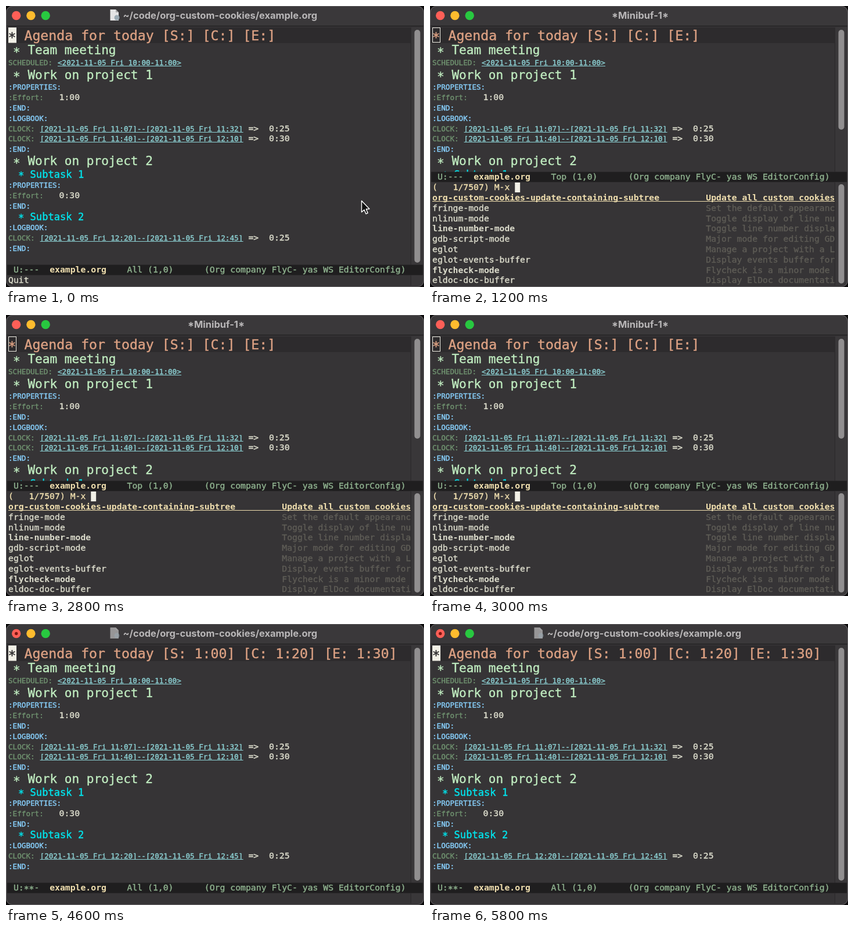
Write an HTML page with a canvas that moves like this. It is 720x484 px and loops after 6 s.

```html
<!DOCTYPE html>
<html lang="en">
<head>
<meta charset="utf-8">
<title>Org custom cookies</title>
<style>
  html, body { margin: 0; width: 100%; height: 100%; overflow: hidden; background: #000; }
  canvas { display: block; }
</style>
</head>
<body>
<canvas id="stage" width="720" height="484"></canvas>
<script>
const ctx = document.getElementById('stage').getContext('2d');

const LOOP = 6000, HIDE_POINTER = 600, OPEN_PROMPT = 1200, RUN_COMMAND = 3600;
const MONO = '"DejaVu Sans Mono", monospace';
const LEFT = 4, RIGHT = 697, ROW = 17.78, BASE = 13.8;
const BODY = 14.77, SMALL = 12.64, H1 = 23.2, H2 = 21.05, H3 = 17.1;

const C = {
  bg: '#363436', bar: '#3a383a', stripe: '#2d2b2d', track: '#393739', edge: '#2b292b',
  thumb: '#918f90', border: '#656365', mode: '#1f1e1f', modeText: '#8fb28f',
  text: '#dcdccc', yellow: '#f0dfaf', h1: '#dca183', h2: '#bfebbf', h3: '#00e5ee',
  drawer: '#87cefa', key: '#6f916f', date: '#8cd0d3', dim: '#5e5c56',
  cursor: '#f2f0e6', title: '#b9b7b8'
};

const COMMANDS = [
  ['fringe-mode', 'Set the default appearance of fringes'],
  ['nlinum-mode', 'Toggle display of line numbers'],
  ['line-number-mode', 'Toggle line number display', true],
  ['gdb-script-mode', 'Major mode for editing GDB scripts'],
  ['eglot', 'Manage a project with a Language Server'],
  ['eglot-events-buffer', 'Display events buffer for server'],
  ['flycheck-mode', 'Flycheck is a minor mode for checking', true],
  ['eldoc-doc-buffer', 'Display ElDoc documentation buffer']
];

function rect(x, y, w, h, color) {
  ctx.fillStyle = color;
  ctx.fillRect(x, y, w, h);
}

function disc(x, y, r, color) {
  ctx.fillStyle = color;
  ctx.beginPath();
  ctx.arc(x, y, r, 0, Math.PI * 2);
  ctx.fill();
}

function pill(x, y, w, h, r, color) {
  ctx.fillStyle = color;
  ctx.beginPath();
  ctx.roundRect(x, y, w, h, r);
  ctx.fill();
}

function shape(points, color) {
  ctx.fillStyle = color;
  ctx.beginPath();
  points.forEach(([x, y]) => ctx.lineTo(x, y));
  ctx.closePath();
  ctx.fill();
}

// Draws one run and returns the x after it; asterisks sit at mid height.
// Regular weight gets a hairline stroke to look as heavy as smoothed text.
function put(str, x, y, color, size = BODY, bold = false) {
  const step = size * 0.602;
  ctx.font = `${bold ? 'bold ' : ''}${size}px ${MONO}`;
  ctx.fillStyle = ctx.strokeStyle = color;
  ctx.lineWidth = 0.4;
  ctx.lineJoin = 'round';
  ctx.textAlign = 'left';
  let at = x;
  for (const part of str.split(/(\*)/)) {
    const base = part === '*' ? y + size * 0.15 : y;
    ctx.fillText(part, at, base);
    if (!bold) ctx.strokeText(part, at, base);
    at += part.length * step;
  }
  return at;
}

function link(str, x, y) {
  const end = put(str, x, y, C.date, SMALL);
  rect(x, Math.round(y + 1.2), end - x, 1, C.date);
  return end;
}

function outline(header, hollow) {
  let y = 37;
  const space = BODY * 0.602;

  const heading = (level, str) => {
    const [size, height, base, color] = level === 2
      ? [H2, 24.4, 19.4, C.h2] : [H3, 19.8, 16.1, C.h3];
    put('* ' + str, LEFT - 0.8 + (level - 1) * space, y + base, color, size);
    y += height;
  };
  const drawer = name => {
    put(`:${name}:`, LEFT, y + BASE, C.drawer, SMALL);
    y += ROW;
  };
  const effort = value => {
    const x = put(':Effort:', LEFT, y + BASE, C.key, SMALL);
    put('   ' + value, x, y + BASE, C.text);
    y += ROW;
  };
  const stamp = (key, date, rest = '') => {
    const x = put(key, LEFT, y + BASE, C.key, SMALL) + space;
    put(rest, link(date, x, y + BASE), y + BASE, C.text);
    y += ROW;
  };
  const clock = (from, to, sum) => stamp('CLOCK:',
    `[2021-11-05 Fri ${from}]--[2021-11-05 Fri ${to}]`, ` =>  ${sum}`);

  rect(0, 37, RIGHT, 27, C.stripe);
  if (hollow) {
    ctx.strokeStyle = C.cursor;
    ctx.lineWidth = 1;
    ctx.strokeRect(4.5, 37.5, 13, 25);
  } else {
    rect(4, 37, 14, 26.5, C.cursor);
  }
  const x = put('*', LEFT - 0.5, y + 21.5, hollow ? C.h1 : C.stripe, H1);
  put(' ' + header, x, y + 21.5, C.h1, H1);
  y += 27;

  heading(2, 'Team meeting');
  stamp('SCHEDULED:', '<2021-11-05 Fri 10:00-11:00>');
  heading(2, 'Work on project 1');
  drawer('PROPERTIES');
  effort('1:00');
  drawer('END');
  drawer('LOGBOOK');
  clock('11:07', '11:32', '0:25');
  clock('11:40', '12:10', '0:30');
  drawer('END');
  heading(2, 'Work on project 2');
  heading(3, 'Subtask 1');
  drawer('PROPERTIES');
  effort('0:30');
  drawer('END');
  heading(3, 'Subtask 2');
  drawer('LOGBOOK');
  clock('12:20', '12:45', '0:25');
  drawer('END');
}

function modeLine(y, flags, place) {
  const base = y + BASE - 0.4;
  rect(2, y, 716, ROW, C.mode);
  let x = put(` U:${flags}  `, LEFT, base, C.modeText);
  x = put('example.org', x, base, C.yellow, BODY, true);
  put(`    ${place} (1,0)      (Org company FlyC- yas WS EditorConfig)`, x, base, C.modeText);
}

function track(top, bottom) {
  rect(697, top, 21, bottom - top, C.track);
  rect(697, top, 1, bottom - top, C.edge);
}

function scrollbar(top, bottom, from, to) {
  track(top, bottom);
  pill(703.5, from, 10, to - from, 5, C.thumb);
}

function prompt() {
  const top = 303.5;
  rect(1, top, 717, 178, C.bg);
  scrollbar(top, 481.3, 307, 478);
  const x = put('(   1/7507) M-x ', LEFT, top + BASE, C.yellow);
  rect(x, top + 0.5, 8.9, 17, C.cursor);

  ctx.save();
  ctx.beginPath();
  ctx.rect(0, top, RIGHT, 180);
  ctx.clip();
  const column = LEFT + 53 * BODY * 0.602;
  let y = top + ROW + BASE;
  put('org-custom-cookies-update-containing-subtree', LEFT, y, C.yellow, BODY, true);
  put('Update all custom cookies', column, y, C.yellow, BODY, true);
  rect(LEFT, Math.round(y + 1.2), RIGHT - LEFT, 1, C.yellow);
  for (const [name, about, bold] of COMMANDS) {
    y += ROW;
    put(name, LEFT, y, C.text, BODY, bold);
    put(about, column, y, C.dim);
  }
  ctx.restore();
}

function titleBar(title, modified) {
  rect(0, 0, 720, 34, C.bar);
  rect(0, 34, 720, 1, '#1c1b1c');
  disc(17.7, 16.5, 7.7, '#fe5f57');
  disc(42.9, 16.5, 7.7, '#febc2e');
  disc(68.2, 16.5, 7.7, '#28c840');
  if (modified) disc(17.7, 16.5, 2.7, '#7d1510');

  ctx.font = '700 16.4px Inter, sans-serif';
  ctx.fillStyle = C.title;
  if (title) {
    ctx.textAlign = 'center';
    ctx.fillText(title, 362, 21.7);
    return;
  }
  ctx.textAlign = 'left';
  ctx.fillText('~/code/org-custom-cookies/example.org', 201.5, 21.7);
  ctx.globalAlpha = modified ? 0.55 : 1;
  shape([[179.5, 6], [189, 6], [194, 11], [194, 25], [179.5, 25]], '#e4e4e4');
  shape([[189, 6], [194, 11], [189, 11]], '#a9a9a9');
  disc(191, 20, 4.5, '#9aa9b2');
  ctx.globalAlpha = 1;
}

function pointer() {
  const arrow = [[612.5, 335.5], [612.5, 355], [617, 351], [620, 358],
    [623.2, 356.5], [620.3, 349.8], [626, 349.5]];
  shape(arrow, '#111');
  ctx.strokeStyle = '#fff';
  ctx.lineWidth = 1.4;
  ctx.lineJoin = 'round';
  ctx.stroke();
}

function draw(t) {
  const asking = t >= OPEN_PROMPT && t < RUN_COMMAND;
  const done = t >= RUN_COMMAND;
  const split = asking ? 285.7 : 445.7;

  rect(0, 0, 720, 484, '#0b0a0b');
  ctx.save();
  ctx.beginPath();
  ctx.roundRect(0, 0, 720, 484, 11);
  ctx.clip();
  rect(0, 0, 720, 484, C.bg);
  titleBar(asking ? '*Minibuf-1*' : '', done);

  ctx.save();
  ctx.beginPath();
  ctx.rect(0, 36, RIGHT, split - 36);
  ctx.clip();
  outline(done ? 'Agenda for today [S: 1:00] [C: 1:20] [E: 1:30]'
    : 'Agenda for today [S:] [C:] [E:]', asking);
  ctx.restore();

  scrollbar(37, split, 41, asking ? 213 : 442);
  if (!asking) track(463.5, 481.3);
  modeLine(split, done ? '**-' : '---', asking ? 'Top' : 'All');
  if (asking) prompt();
  else if (!done) put('Quit', LEFT, 477.3, C.text);
  if (t < HIDE_POINTER) pointer();
  ctx.restore();

  ctx.strokeStyle = C.border;
  ctx.lineWidth = 1;
  ctx.beginPath();
  ctx.roundRect(0.5, 0.5, 719, 483, 10.5);
  ctx.stroke();
}

const start = performance.now();
function tick() {
  draw((performance.now() - start) % LOOP);
  requestAnimationFrame(tick);
}
tick();
</script>
</body>
</html>
```
